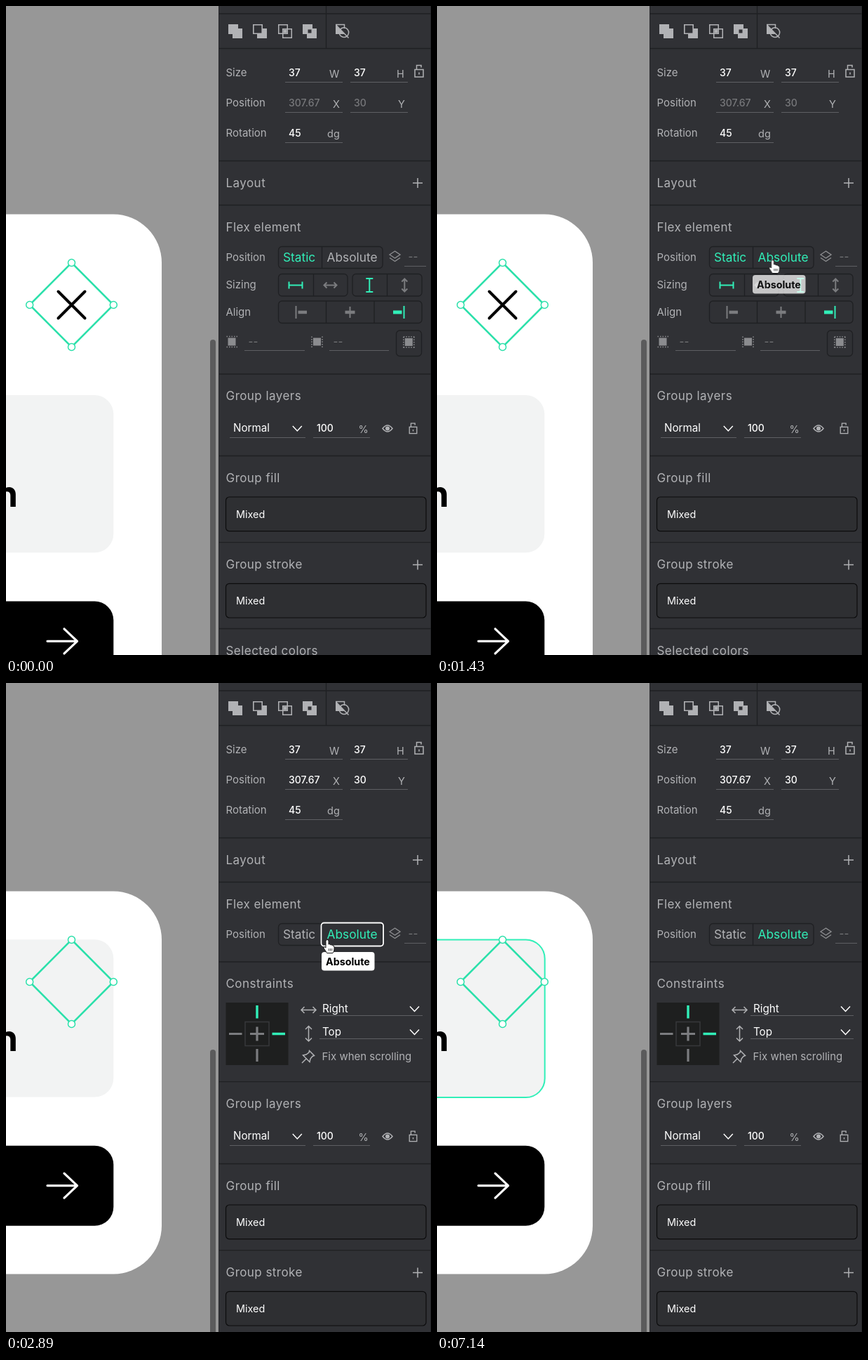
Recreate the animation shown at these times as an HTML page. Size 606 px wide and 924 px high, loop 8000 ms.

```html
<!DOCTYPE html>
<html lang="en">
<head>
<meta charset="utf-8">
<title>Absolute position in a flex layout</title>
<style>
html, body { margin: 0; width: 100%; height: 100%; overflow: hidden; background: #979797; }
svg { display: block; width: 606px; height: 924px; }
text { font: 15px Inter, "Open Sans", sans-serif; fill: #b1b2b5; }
.head { font-size: 17px; letter-spacing: .45px; }
.tab { font-size: 17.3px; }
.num { font-size: 14px; font-weight: 500; fill: #fff; }
.pick { font-size: 15.2px; fill: #fff; }
.mixed { font-size: 14.4px; fill: #fff; }
.unit { font-size: 14.5px; }
.dim { fill: #77787b; }
.tip text { font-size: 14.3px; font-weight: 700; fill: #000; }
.letter { font-size: 51px; font-weight: 700; fill: #000; }
.line { fill: none; stroke: #b1b2b5; stroke-width: 1.5; }
.gray { fill: none; stroke: #7b7c7f; stroke-width: 2; }
.mint { fill: none; stroke: #31efb8; stroke-width: 2; }
.rule { fill: none; stroke: #1f2023; stroke-width: 1.3; }
.field { fill: none; stroke: #5e5f63; stroke-width: 1; }
.box { fill: #2e2f32; stroke: #0c0c0d; stroke-width: 1.2; }
.bool { fill: #b1b2b5; fill-rule: evenodd; }

/* 8 s loop: 1% = 80 ms */
.old, .new, .values, .static, .absolute, .card, .thumb, .layers,
.focus, .hoverBtn, .hoverBox, .arrow, .hand { animation: 8s step-end infinite; }
.old { animation-name: old; }
.new { animation-name: new; }
.values { animation-name: values; }
.static { animation-name: static; }
.absolute { animation-name: absolute; }
.card { animation-name: card; }
.thumb { animation-name: thumb; }
.layers { animation-name: layers; }
.focus { animation-name: focus; }
.hoverBtn { animation-name: hoverBtn; }
.hoverBox { animation-name: hoverBox; }
.arrow { animation-name: arrow; }
.hand { animation-name: hand; }
.tip { animation: tip 8s linear infinite; }
.cursor { animation: move 8s linear infinite; }

@keyframes old { 0% { visibility: visible } 22.75%, 100% { visibility: hidden } }
@keyframes new { 0% { visibility: hidden } 22.75%, 100% { visibility: visible } }
@keyframes values { 0% { fill: #77787b } 22.75%, 100% { fill: #fff } }
@keyframes static { 0% { fill: #31efb8 } 22.75%, 100% { fill: #b1b2b5 } }
@keyframes absolute { 0% { fill: #b1b2b5 } 11%, 100% { fill: #31efb8 } }
@keyframes card { 0% { transform: none } 22.75%, 100% { transform: translateY(-188.7px) } }
@keyframes thumb { 0% { transform: none } 22.75%, 100% { transform: translateY(47px) } }
@keyframes layers { 0% { transform: none } 22.75%, 100% { transform: translateY(44px) } }
@keyframes focus { 0% { visibility: hidden } 36.125% { visibility: visible } 82.75%, 100% { visibility: hidden } }
@keyframes hoverBtn { 0% { visibility: hidden } 75.125% { visibility: visible } 76%, 100% { visibility: hidden } }
@keyframes hoverBox { 0% { visibility: hidden } 76.75% { visibility: visible } 79.25% { visibility: hidden } 89.25%, 100% { visibility: visible } }
@keyframes arrow { 0% { visibility: hidden } 1.75% { visibility: visible } 11% { visibility: hidden } 64.25% { visibility: visible } 65.125%, 100% { visibility: hidden } }
@keyframes hand { 0% { visibility: hidden } 11% { visibility: visible } 64.25%, 100% { visibility: hidden } }
@keyframes tip { 0%, 16.9% { opacity: 0 } 17.875% { opacity: .72 } 18.5%, 64.24% { opacity: 1 } 64.25%, 100% { opacity: 0 } }
@keyframes move {
  0%, 1.75% { transform: translate(280px, 881px) }
  5% { transform: translate(357px, 625px) }
  8.5% { transform: translate(435px, 432px) }
  11% { transform: translate(462px, 369px) }
  11.875% { transform: translate(464.5px, 364.5px) }
  14.5% { transform: translate(475px, 355px) }
  17.875%, 26.4% { transform: translate(478.5px, 361px) }
  29.5% { transform: translate(466px, 363px) }
  32%, 64.24% { transform: translate(458px, 365px) }
  64.25%, 100% { transform: translate(373px, 301.5px) }
}
</style>
</head>
<body>
<svg viewBox="0 0 606 924">
  <defs>
    <path id="plus" class="line" d="M-7 0H7M0-7V7"/>
    <path id="chevron" fill="none" stroke="#fff" stroke-width="1.5" d="M-6.5-3.5L0 3.5L6.5-3.5"/>
    <g id="lock" class="line">
      <rect x="-6" y="-3" width="12" height="10.5"/>
      <path d="M-3.5-3V-9H3V-6M0 1V4"/>
    </g>
    <path id="spread" d="M-9 0H9M-5-4L-9 0L-5 4M5-4L9 0L5 4"/>
    <path id="span" d="M-9.5-5V5M9.5-5V5M-9.5 0H9.5"/>
    <rect id="block" x="-5.5" y="-5.5" width="11" height="11" fill="#8b8c8f"/>
    <path id="dots" d="M-7.5-7.5H8M-7.5 7.5H8" stroke="#8b8c8f" stroke-width="1.5" stroke-dasharray="1.5 2"/>
    <circle id="knob" r="5" fill="#fff" stroke="#2be0aa" stroke-width="1.5"/>
  </defs>

  <!-- Canvas -->
  <rect width="606" height="924" fill="#979797"/>
  <rect x="-200" y="296.5" width="422" height="734" rx="69" fill="#fff" class="old"/>
  <rect x="-200" y="296.5" width="422" height="545" rx="69" fill="#fff" class="new"/>
  <path d="M74.5 406.5L112.5 444.5M112.5 406.5L74.5 444.5" stroke="#000" stroke-width="4" stroke-linecap="round"/>
  <g class="card">
    <rect x="-200" y="554" width="353.3" height="224.3" rx="27" fill="#f2f3f3"/>
    <text class="letter" x="17" y="713" text-anchor="end">n</text>
    <rect x="-200" y="847.5" width="353.3" height="114" rx="27"/>
    <path d="M59 904.3H101M83 886.8L101.5 904.3L83 921.8" fill="none" stroke="#fff" stroke-width="3.2" stroke-linecap="round" stroke-linejoin="round"/>
  </g>
  <rect class="mint hoverBtn" x="-200" y="659" width="353.7" height="114.5" rx="27"/>
  <rect class="mint hoverBox" x="-200" y="365.5" width="353.7" height="224.5" rx="27"/>
  <path d="M93.5 365.5L153.3 425.5L93.5 485.5L33.7 425.5Z" fill="none" stroke="#2be0aa" stroke-width="2.5"/>
  <use href="#knob" x="93.5" y="365.5"/>
  <use href="#knob" x="153.3" y="425.5"/>
  <use href="#knob" x="93.5" y="485.5"/>
  <use href="#knob" x="33.7" y="425.5"/>
  <rect class="thumb" x="291" y="475" width="8" height="500" rx="4" fill="#5b5b5c"/>

  <!-- Panel -->
  <rect x="303" width="303" height="924" fill="#303135"/>
  <path d="M303.5 0V924M605.5 0V924" stroke="#26272a"/>
  <path class="rule" d="M304 11H606M304 60.5H606M456.5 0V60M304 220.5H606M304 283.5H606"/>
  <g class="bool">
    <path d="M317 26h14v6h6v14h-14v-6h-6z"/>
    <path d="M352 26h14v6h6v14h-14v-6h-6zM353.6 27.6v10.8h10.8v-10.8z"/>
    <path d="M388 26h14v6h6v14h-14v-6h-6zM389.5 27.5v11h4.5v-6.5h6.5v-4.5zM402 33.5v6.5h-6.5v4.5h11v-11zM395.5 33.5v5h5v-5z"/>
    <path d="M395.5 33.5h5v5h-5z"/>
    <path d="M423 26h14v6h6v14h-14v-6h-6zM430.5 33.5v5h5v-5z"/>
    <path d="M470 27L483 40H470Z"/>
  </g>
  <path class="line" d="M470 26.5H482.5V32M470.5 27L488.5 45.5M476.5 33.5A6.8 6.8 0 1 1 475.5 40"/>

  <text x="313.5" y="100">Size</text>
  <text x="313.5" y="143">Position</text>
  <text x="313.5" y="186">Rotation</text>
  <text class="num" x="403" y="100">37</text>
  <text class="num" x="496" y="100">37</text>
  <text class="num values" x="403" y="143">307.67</text>
  <text class="num values" x="496" y="143">30</text>
  <text class="num" x="403" y="186">45</text>
  <text class="unit" x="461" y="101.5">W</text>
  <text class="unit" x="557" y="101.5">H</text>
  <text class="unit" x="466" y="144.5">X</text>
  <text class="unit" x="559" y="144.5">Y</text>
  <text class="unit" x="458" y="187">dg</text>
  <path class="field" d="M398 108.5H480M491 108.5H573M398 151.5H480M491 151.5H573M398 194.5H480"/>
  <use href="#lock" x="589" y="93.5"/>

  <text class="head" x="313.5" y="258">Layout</text>
  <use href="#plus" x="587" y="252"/>
  <text class="head" x="313.5" y="321">Flex element</text>
  <text x="313.5" y="363">Position</text>
  <rect class="rule" x="388.5" y="342.5" width="148.5" height="31" rx="5"/>
  <path class="rule" d="M450.5 343V373"/>
  <text class="tab static" x="395" y="364">Static</text>
  <text class="tab absolute" x="457.5" y="364">Absolute</text>
  <path fill="none" stroke="#8b8c8f" stroke-width="1.4" d="M547 354L554.5 349L562 354L554.5 359ZM547 358.5L554.5 363.5L562 358.5"/>
  <text class="dim" x="573.5" y="362">--</text>
  <path class="field" d="M568 370.5H599"/>

  <g class="old">
    <text x="313.5" y="402">Sizing</text>
    <text x="313.5" y="441">Align</text>
    <g class="rule">
      <rect x="388.5" y="381.5" width="98.5" height="31.5" rx="5"/>
      <rect x="494" y="381.5" width="99" height="31.5" rx="5"/>
      <rect x="388.5" y="420" width="204.5" height="31.5" rx="5"/>
      <rect x="556.5" y="462" width="36" height="36.5" rx="5"/>
      <path d="M438.5 382V413M543.5 382V413M456.5 420V451M525 420V451"/>
    </g>
    <g class="mint">
      <use href="#span" x="413" y="397.5"/>
      <use href="#span" transform="translate(518.3 397.5) rotate(90)"/>
      <path d="M567.5 427V445"/>
      <path d="M552 436H564.5" stroke-width="5"/>
    </g>
    <g class="gray">
      <use href="#spread" x="462.5" y="397.5"/>
      <use href="#spread" transform="translate(568.3 397.5) rotate(90)"/>
      <path d="M413.5 427V445M490.5 428V444"/>
      <path d="M416.5 436H429M483.5 436H497.5" stroke-width="4.5"/>
    </g>
    <use href="#block" x="322" y="478"/>
    <use href="#dots" x="322" y="478"/>
    <use href="#block" x="443.5" y="478"/>
    <use href="#dots" transform="translate(443.5 478) rotate(90)"/>
    <use href="#block" x="574.3" y="478.5"/>
    <use href="#dots" x="574.3" y="478.5"/>
    <use href="#dots" transform="translate(574.3 478.5) rotate(90)"/>
    <text class="dim" x="345.5" y="483">--</text>
    <text class="dim" x="466.5" y="483">--</text>
    <path class="field" d="M340 490.5H426M461 490.5H546"/>
    <path class="rule" d="M304 524H606"/>
  </g>

  <g class="new">
    <path class="rule" d="M304 397H606M304 567.7H606"/>
    <text class="head" x="313.5" y="434">Constraints</text>
    <rect x="313.5" y="455" width="89" height="89" fill="#1e1f1f"/>
    <rect x="341" y="482.5" width="34" height="34" fill="none" stroke="#37383b" stroke-width="1.5"/>
    <path class="gray" style="stroke-width:3.2" d="M318 499.5H336.5M358 521V539M348 499.5H368M358 489.5V509.5"/>
    <path class="mint" style="stroke-width:3.4" d="M358 459V477.5M379.5 499.5H398"/>
    <g class="line">
      <path d="M421 465.5H442M425.5 461L421 465.5L425.5 470M437.5 461L442 465.5L437.5 470"/>
      <path d="M431.5 488.5V510M427 493L431.5 488.5L436 493M427 505.5L431.5 510L436 505.5"/>
      <path d="M432.5 523.5L439.5 530.5L437 531.5L434 535L433 539.5L423.5 530L428 529L432 526ZM428 535L422 541"/>
    </g>
    <text class="pick" x="451" y="469">Right</text>
    <text class="pick" x="451" y="502">Top</text>
    <text x="450.5" y="537">Fix when scrolling</text>
    <path class="field" d="M447 473.5H594M447 506.5H594"/>
    <use href="#chevron" x="582.5" y="464"/>
    <use href="#chevron" x="582.5" y="497"/>
  </g>

  <g class="layers">
    <path class="rule" d="M304 640.5H606M304 763.7H606M304 886.5H606"/>
    <text class="head" x="313.5" y="561">Group layers</text>
    <text class="pick" x="324" y="606">Normal</text>
    <use href="#chevron" x="415.3" y="601.5"/>
    <text class="num" x="443" y="606">100</text>
    <text class="unit" x="502.5" y="607.5">%</text>
    <path class="field" d="M319 614.5H427M438 614.5H519"/>
    <path class="line" d="M537 601.5Q544 592.5 551 601.5Q544 610.5 537 601.5Z"/>
    <circle cx="544" cy="601.5" r="3" fill="#b1b2b5"/>
    <use href="#lock" transform="translate(580.5 602) scale(.88)"/>
    <text class="head" x="313.5" y="678">Group fill</text>
    <rect class="box" x="313.5" y="699" width="285.5" height="48.7" rx="5"/>
    <text class="mixed" x="328" y="729">Mixed</text>
    <text class="head" x="313.5" y="801">Group stroke</text>
    <use href="#plus" x="587" y="795.5"/>
    <rect class="box" x="313.5" y="822.3" width="285.5" height="48.7" rx="5"/>
    <text class="mixed" x="328" y="852">Mixed</text>
    <text class="head" x="313.5" y="924">Selected colors</text>
  </g>

  <rect class="focus" x="449.5" y="341.5" width="88.5" height="33" rx="4" fill="none" stroke="#fff" stroke-width="1.8"/>
  <g class="tip">
    <rect x="450" y="383" width="75.5" height="26.5" rx="4" fill="#fff"/>
    <text x="456" y="402">Absolute</text>
  </g>

  <!-- Pointer, with its tip at the group's zero point -->
  <g class="cursor" stroke="#1a1a1a" stroke-linejoin="round">
    <path class="arrow" fill="#fff" stroke-width=".8" d="M.5 .5V18L4.3 14.5L7 20.5L10 19.2L7.5 13.3H12.8Z"/>
    <g class="hand">
      <path fill="#fff" stroke-width="1" d="M-2 1.8Q0-1.2 2 1.8V7Q4 6 5 8Q7 7 7.8 9Q10 8.5 10 11V14Q10 17 8 19.5H-.5Q-2 16.5-4.7 13Q-5.5 11-3.8 10.7Q-2.8 10.8-2 12Z"/>
      <path d="M2.3 13V16.5M4.5 13V16.5M6.7 13V16.5" stroke-width=".8"/>
    </g>
  </g>
</svg>
</body>
</html>
```
